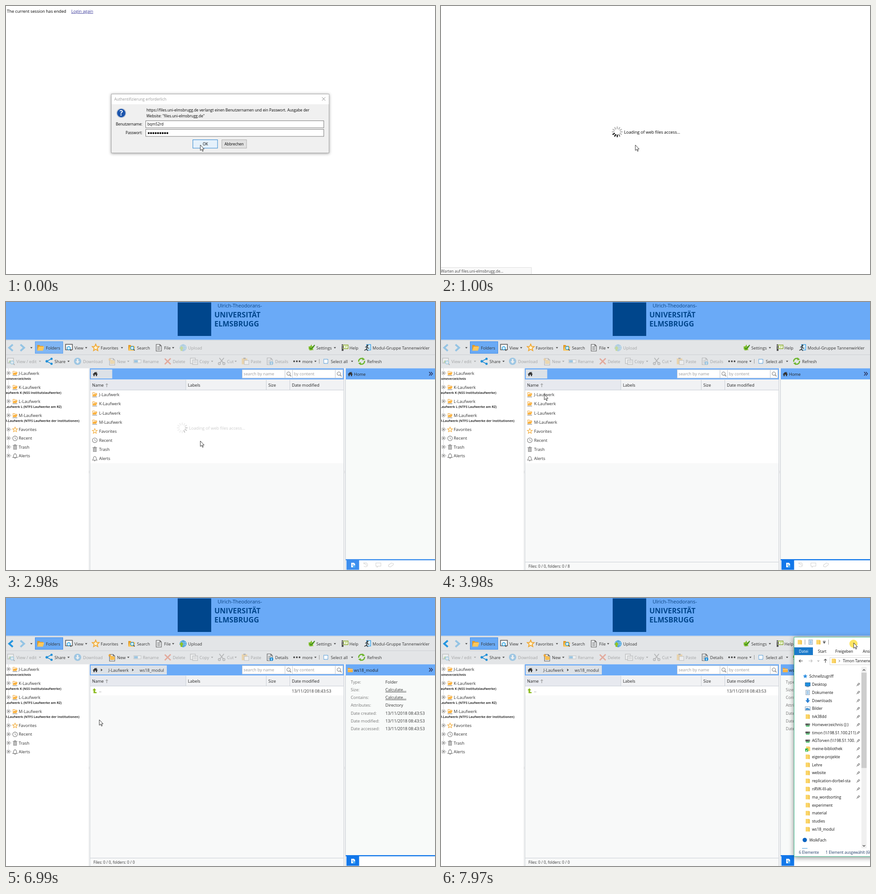
Write an HTML page that moves like this. It is 947x592 px and loops after 8 s.

```html
<!DOCTYPE html>
<html lang="en">
<head>
<meta charset="utf-8">
<title>Web files access</title>
<style>
html, body { margin: 0; width: 100%; height: 100%; overflow: hidden; background: #fff; }
svg { display: block; width: 100vw; height: 100vh; font-family: "Open Sans", "Noto Sans", sans-serif; }
text { white-space: pre; }
</style>
</head>
<body>
<svg id="stage" viewBox="0 0 947 592"></svg>
<script>
const stage = document.getElementById('stage');
const LOOP = 8000;
const STARTS = [0, 1000, 1980, 2980, 3980, 4990, 6010, 6990, 7970];
const BLUE = '#6aaaf7', BAR = '#e3e5e7', INK = '#333';
const HOST = 'files.uni-elmsbrugg.de', COURSE = 'ws18_modul';

const text = (x, y, s, size = 9.2, fill = INK, more = '') =>
  `<text x="${x}" y="${y}" font-size="${size}" fill="${fill}" ${more}>${s}</text>`;
const rect = (x, y, w, h, fill, more = '') =>
  `<rect x="${x}" y="${y}" width="${w}" height="${h}" fill="${fill}" ${more}/>`;
const path = (d, fill, more = '') => `<path d="${d}" fill="${fill}" ${more}/>`;
const line = (d, color, w = 1, more = '') => path(d, 'none', `stroke="${color}" stroke-width="${w}" ${more}`);
const circle = (x, y, r, fill, more = '') => `<circle cx="${x}" cy="${y}" r="${r}" fill="${fill}" ${more}/>`;
const at = (x, y, s, more = '', scale = 1) =>
  `<g transform="translate(${x} ${y}) scale(${scale})" ${more}>${s}</g>`;
const edge = (c, w = 1) => `stroke="${c}" stroke-width="${w}"`;
const tri = (x, y) => path(`M${x - 2.5} ${y - 1.3}h5l-2.5 3z`, '#444');
const triRight = (x, y) => path(`M${x - 1.5} ${y - 3}v6l3.5-3z`, '#444');

const starPath = r => 'M' + Array.from({ length: 10 }, (_, i) => {
  const a = i * Math.PI / 5, k = i % 2 ? r * 0.45 : r;
  return `${(k * Math.sin(a)).toFixed(2)} ${(-k * Math.cos(a)).toFixed(2)}`;
}).join('L') + 'z';
const folder = path('M-5.5-4.5h4.5l1 1.5h5.5v1.2h-11z', '#f0a02c') + path('M-5.5-1.2h11v6.2h-11z', '#fdb541') + line('M-5.5-1.4h11', '#fff2d6', 0.8);
const lens = line('M2.2 2.2L5 5', '#444', 1.8) + circle(-0.5, -0.5, 3.6, '#d9f0fb', edge('#1f9bdc', 1.5));
const sheet = line('M-5.5-7.5h8l3.5 3.5v11.5h-11.5zM2.5-7.5v3.5h3.5M-3-2h6M-3 1h6M-3 4h6', '#666', 1.2);
const openFolder = path('M-7-6h5l1.5 2h6.5v10h-13z', '#e09a28') + path('M-4-2.5h12.5l-3 9h-12.5z', '#fdc75c');

const ICONS = {
  folder,
  openFolder,
  drive: line('M-4.5 3v-7.5h3.5l1 1.5h4v2', '#f3b04a', 1.2) + path('M-2.5-1.5h8l-2.6 5h-8z', '#fbb03b') + line('M-5.5 5h10.5', '#888', 1.2),
  star: path(starPath(5.8), '#fffbe8', edge('#f2a93b', 1.1)),
  bigStar: path(starPath(8), '#fff3d0', edge('#f0a52d', 1.8)),
  clock: circle(0, 0, 5.2, '#fff', edge('#777', 1.1)) + line('M0-3v3.3l2.4 1.3', '#777'),
  trash: path('M-4-3h8v8.5h-8z', '#a2a2a2') + line('M-5-4h10M-2-5.2h4', '#888', 1.2) + line('M-1.8-1.5v5.5M0-1.5v5.5M1.8-1.5v5.5', '#eee', 0.7),
  bell: path('M-4.8 3.5C-2.5 1.5-4-4.5 0-4.8C4-4.5 2.5 1.5 4.8 3.5z', '#fff', edge('#777', 1.1)) + circle(0, 5, 1.1, '#777'),
  home: path('M-5.5.5L0-4.8 5.5.5 4.5 1.4 4 1v3.8h-2.6v-3.2h-2.8v3.2h-2.6v-3.8l-.5.4z', '#333') + rect(2.2, -4.5, 1.4, 3, '#333'),
  search: line('M2 2L5 5.2', '#777', 1.4) + circle(-0.8, -0.8, 3.7, 'none', edge('#777', 1.1)),
  view: rect(-7.5, -7.5, 15, 12, '#fff', edge('#555', 1.6)) + at(0, 1.5, lens),
  find: openFolder + at(2, 1, lens),
  sheet,
  globe: circle(1, 0, 7.2, '#9bd2f2', edge('#2e9be6')) + line('M1-7v14M-6 0h14M-4.5-4h11M-4.5 4h11M1-7c-5 4-5 10 0 14M1-7c5 4 5 10 0 14', '#2e86c4', 0.8) + path('M-4.5 7v-5h-3l5-6 5 6h-3v5z', '#8fc31f'),
  settings: path(starPath(7.5), '#7dbd2c') + circle(-1, 1, 5, '#86c232') + line('M-3.5 0l3 3 8-9', '#3d8b1d', 2),
  help: rect(-3, -6, 10, 8, '#fff', edge('#88a82b', 1.5)) + line('M0-3.5h5M0-1h4', '#8fc31f', 1.2) + circle(-5.5, -6, 1.7, '#555') + line('M-6-3v10M-7-3l5 2M-4 2v5', '#555', 2),
  user: rect(-2, -7, 9, 12, '#d7eefb', edge('#2e9be6', 1.3)) + circle(0, -5, 1.9, '#444') + line('M-5-1l4-2 2 4 3 0M-1-2l-1 5 3 4M-2 3l-5 3', '#444', 1.6),
  edit: rect(-7.5, -7, 13, 11, '#fff', edge('#777', 1.3)) + path('M-6 3l4-6 4 6z', '#6bab4a') + at(3, 3, lens),
  share: line('M6-6L-5 0l11 6', '#1f8fd8', 1.6) + circle(5.5, -5.5, 2.5, '#1f8fd8') + circle(-5, 0, 2.8, '#1f8fd8') + circle(5.5, 5.5, 2.5, '#1f8fd8'),
  download: circle(0, 0, 8, '#2592dc') + path('M-1.8-5h3.6v5h3l-4.8 5-4.8-5h3z', '#fff'),
  add: at(1, 1, sheet) + path('M-3-3h5l1 1.5h4v7h-10z', '#fbbf4e') + path(starPath(4), '#f0a52d', 'transform="translate(-4 -4)"'),
  rename: rect(-8, -3.5, 16, 7, '#fff', edge('#888')) + rect(-7, -2.5, 8, 5, '#1f8fd8'),
  remove: line('M-6.5-6L6.5 6.5M6.5-6.5L-6.5 6.5', '#e2461f', 3),
  copy: rect(-8, -7, 11, 12, '#fff', edge('#777', 1.3)) + rect(-3, -3, 11, 10, '#fff', edge('#777', 1.3)) + line('M-1 0h7M-1 3h7', '#777'),
  cut: line('M-5-7.5L4 4M5-7.5L-4 4', '#666', 2) + circle(-5, 5, 2.4, 'none', edge('#666', 1.6)) + circle(5, 5, 2.4, 'none', edge('#666', 1.6)),
  paste: rect(-7.5, -6.5, 12, 13, '#f5b547') + rect(-4, -8, 5, 3, '#666') + rect(-2, -2, 10, 9, '#fff', edge('#777')),
  details: sheet + circle(4, 4, 4, '#1f8fd8') + rect(3.3, 3, 1.4, 4, '#fff') + rect(3.3, 1.2, 1.4, 1.2, '#fff'),
  dots: [-6, 0, 6].map(x => circle(x, 0, 1.9, '#444')).join(''),
  select: rect(-4.5, -4.5, 9, 9, '#fff', edge('#1f7fd0', 1.4) + ' stroke-dasharray="1.6 1.4"'),
  refresh: line('M-6.3 1A6.3 6.3 0 0 1 3.5-5.2M6.3-1A6.3 6.3 0 0 1-3.5 5.2', '#6cb52d', 2.6) + path('M2-8.5l5.5 4.5-6 2z', '#6cb52d') + path('M-2 8.5l-5.5-4.5 6-2z', '#6cb52d'),
  up: path('M-5-1L-1-5.5 3-1H.7v4H4v2.5H-2.7V-1z', '#8aba1c'),
  yellow: path('M-4.5-5h7l2 1.5v8.5h-9z', '#fbd569') + path('M2.5-5l2 1.5v8.5h-2z', '#eebf45'),
  pin: line('M-3.5 3.5L-.8.8M-2-.8l2.8 2.8M-1-.8l2.5-2.4M.8 1l2.4-2.5M1-3.5l2.5 2.5', '#777', 1.1),
  desktop: rect(-5.5, -4, 11, 7.5, '#1d8fe0', edge('#245f92', 0.8)) + line('M-3 5h6', '#245f92'),
  doc: rect(-4, -5, 8, 10, '#fff', edge('#6c8aa8', 0.9)) + line('M-2.5-2.5h5M-2.5 0h5M-2.5 2.5h5', '#2b86cf', 1.1),
  down: path('M-2-5h4v4.5h3L0 5.5-5-.5h3z', '#2a80d2'),
  image: rect(-5.5, -4, 11, 8, '#fff', edge('#6c8aa8', 0.9)) + path('M-4.5 3v-3l3-1.5 6 2v2.5z', '#3d8fd0'),
  net: rect(-5, -2.5, 10, 4, '#555') + rect(-4, 2, 8, 2, '#22b24c') + rect(2, -1.2, 2, 1.2, '#7bea8c'),
  check: at(1, 0, path('M-4.5-5h7l2 1.5v8.5h-9z', '#fbd569')) + rect(-5.5, -0.5, 6.5, 6.5, '#1fae3a') + line('M-4.2 3l1.5 1.5 2.6-3', '#fff', 1.1),
  quick: path(starPath(5.2), '#2f8fe0'),
  dot: circle(0, 0, 4.8, '#0a64c2')
};
const icon = (name, x, y, opacity = 1, scale = 1) => at(x, y, ICONS[name], `opacity="${opacity}"`, scale);

function spinner(x, y, head, scale = 1) {
  const shades = ['#000', '#000', '#111', '#777'];
  let s = '';
  for (let i = 0; i < 12; i++) {
    const shade = shades[(head - i + 12) % 12] || '#b8b8b8';
    s += rect(-1.2, -12, 2.4, 6, shade, `rx="1" transform="rotate(${i * 30})"`);
  }
  return at(x, y, s, '', scale);
}
const loader = (head, opacity) =>
  `<g opacity="${opacity}">${spinner(389, 278, head)}${text(404, 282, 'Loading of web files access...', 9.3, '#000')}</g>`;

const cursor = (x, y) =>
  at(x, y, path('M0 0V12.2L2.8 9.6 4.8 14 6.6 13.2 4.7 9H8.4z', '#fff', edge('#000', 0.8)));

function login() {
  const size = 8.35;
  let s = text(2, 15, 'The current session has ended', 9.2, '#000')
    + text(144, 15, 'Login again', 9.1, '#3b3a9a', 'text-decoration="underline"')
    + rect(232.5, 194.5, 480.5, 130, '#f0f0f0', edge('#a9a9a9') + ' style="filter:drop-shadow(0 1px 3px #0006)"')
    + rect(233, 195, 479.5, 22, '#fff')
    + text(239, 208.5, 'Authentifizierung erforderlich', size, '#999')
    + line('M697.5 201.5l7.5 7.5M705 201.5l-7.5 7.5', '#888')
    + circle(254.5, 236.5, 10, '#1c55ad', edge('#c3cbd8', 1.6))
    + text(254.5, 242, '?', 15.5, '#fff', 'font-weight="bold" text-anchor="middle"')
    + text(310, 233, `https://${HOST} verlangt einen Benutzernamen und ein Passwort. Ausgabe der`, size, '#000')
    + text(310, 245.5, `Website: "${HOST}"`, size, '#000');
  ['Benutzername:', 'Passwort:'].forEach((label, i) => {
    s += text(301, 264 + 19 * i, label, 8.2, '#000', 'text-anchor="end"')
      + rect(308.5, 253.5 + 19 * i, 393, 15.5, '#fff', edge('#7a7a7a'));
  });
  s += text(312, 264, 'bqm52rd', size, '#000');
  for (let i = 0; i < 9; i++) s += circle(315 + i * 5.15, 280.8, 2.1, '#000');
  const mid = 'text-anchor="middle"';
  return s + rect(412.5, 295.5, 54.5, 18.5, '#e5f1fb', edge('#2b83cf'))
    + text(440, 308, 'OK', size, '#000', mid)
    + rect(476.5, 295.5, 54.5, 18.5, '#e1e1e1', edge('#adadad'))
    + text(503.5, 308, 'Abbrechen', size, '#000', mid);
}

const waiting = () => rect(-0.5, 577.5, 200, 16, '#f9f9f9', edge('#dedede'))
  + text(0, 589, `Warten auf ${HOST}...`, 8.3, '#444');

const header = () => rect(0, 0, 947, 83.5, BLUE) + rect(379, 1, 74, 74, '#00468c')
  + text(467, 12, 'Ulrich-Theodorans-', 11, '#0d4583')
  + text(460, 34, 'UNIVERSITÄT', 16, '#00468c', 'font-weight="bold"')
  + text(460, 54, 'ELMSBRUGG', 16, '#00468c', 'font-weight="bold"');

function pathBar(crumbs, title) {
  const ends = [234.5, 278, 355], starts = [226, 295];
  let s = rect(185, 146.5, 561, 24.5, BLUE) + rect(187, 149, ends[crumbs.length] - 187, 20, '#dce1e7') + icon('home', 197, 159);
  crumbs.forEach((c, i) => s += triRight(211 + 69 * i, 159) + text(starts[i], 162.5, c));
  [[521.5, 'search by name'], [632.5, 'by content']].forEach(([x, hint]) => {
    s += rect(x, 149.5, 94.5, 18.5, '#fff', edge('#c5cbd3')) + text(x + 3, 162, hint, 9.2, '#999')
      + rect(x + 94.5, 149.5, 16.5, 18.5, '#fff', edge('#c5cbd3')) + icon('search', x + 103, 159);
  });
  return s + rect(750, 146.5, 197, 24.5, BLUE)
    + icon(title === 'Home' ? 'home' : 'folder', 760, 159) + text(768, 162.5, title, 9.2, '#222')
    + line('M934 154.5l3.5 4-3.5 4M938 154.5l3.5 4-3.5 4', '#224', 1.3);
}

function emptyApp() {
  const nav = '#9a9fa5';
  return rect(0, 147, 182, 445, '#e4e4e4')
    + rect(54.5, 359.5, 67.5, 22.5, '#ededed', edge(BLUE, 3)) + rect(56.5, 361.5, 63.5, 18.5, 'none', edge('#fff', 0.8))
    + spinner(66, 371, 8, 0.45) + text(74, 374, 'Loading...', 8.8)
    + rect(186, 562.5, 559, 24, '#dde2e7') + line('M186 562.5h559', '#cdd3d9')
    + path('M200 572.5v6l-4-3zM220 572.5v6l-5-3zM314.5 572.5v6l5-3zM334.5 572.5v6l4-3z', nav)
    + line('M194 572.5v6M340.5 572.5v6', nav, 1.3)
    + line('M229.5 570v10M305.5 570v10M349.5 570v10', '#aaa')
    + text(234, 579, 'Page', 8.6) + rect(259.5, 566.5, 21, 17.5, '#e4e7ea', edge('#d2d7dc')) + text(262, 579, '0', 8.6, '#aaa')
    + text(286, 579, 'of 0', 8.6)
    + at(360, 575.5, line('M-3.5 0A3.5 3.5 0 0 1 3-2M3.5 0A3.5 3.5 0 0 1-3 2', '#555', 1.5) + path('M4.5-4.5v4h-4zM-4.5 4.5v-4h4z', '#555'))
    + text(741, 579, 'No data to display', 8.5, INK, 'text-anchor="end"');
}

// icon, icon x, label, label x, arrow x, first scene in which it is enabled
const ROW1 = [
  ['view', 139, 'View', 151, 177, 3], ['bigStar', 198, 'Favorites', 209, 256, 3], ['find', 277, 'Search', 289, 0, 3],
  ['sheet', 337, 'File', 349, 369, 3], ['globe', 390, 'Upload', 402, 0, 5], ['settings', 674, 'Settings', 685, 726, 3],
  ['help', 748, 'Help', 758, 0, 3], ['user', 798, 'Modul-Gruppe Tannenwirkler', 809, 0, 3]
];
const ROW2 = [
  ['edit', 11, 'View / edit', 23, 75, 9], ['share', 95, 'Share', 107, 138, 3], ['download', 158, 'Download', 170, 0, 9],
  ['add', 233, 'New', 245, 270, 5], ['rename', 290, 'Rename', 302, 0, 9], ['remove', 357, 'Delete', 368, 0, 9],
  ['copy', 415, 'Copy', 427, 455, 9], ['cut', 476, 'Cut', 488, 507, 9], ['paste', 528, 'Paste', 540, 0, 9],
  ['details', 582, 'Details', 594, 0, 5], ['dots', 642, 'more', 654, 683, 3], ['select', 706, 'Select all', 717, 764, 3],
  ['refresh', 785, 'Refresh', 797, 0, 3]
];

function toolbar(n) {
  const row = (items, y) => items.map(([name, ix, label, tx, ax, from]) =>
    `<g opacity="${n >= from ? 1 : 0.36}">${icon(name, ix, y)}${text(tx, y + 3.7, label)}${ax ? tri(ax, y) : ''}</g>`).join('');
  const chevron = (x, dir, on) => line(`M${x + 4 * dir} 94l${-8 * dir} 7 ${8 * dir} 7`, '#2596e0', 4, `opacity="${on ? 1 : 0.42}"`);
  return rect(0, 84, 947, 62.5, BAR) + line('M0 84.5h947M0 116.5h947', '#cdd0d3')
    + chevron(11, 1, n >= 5) + chevron(36, -1, false) + tri(56, 101)
    + rect(64.5, 87.5, 61, 26, n === 3 ? '#80b6f4' : '#6aaaf5', edge(n === 3 ? '#5a9fee' : '#3f8ae6'))
    + icon('openFolder', 76, 101) + text(88, 104.7, 'Folders')
    + row(ROW1, 101) + row(ROW2, 131) + line('M691.5 126v10', '#999');
}

function tree() {
  const drives = [
    ['J', 'Homeverzeichnis', 55], ['K', 'Laufwerk K (NSS Institutslaufwerke)', 122],
    ['L', 'Laufwerk L (NTFS Laufwerke am RZ)', 123], ['M', 'M-Laufwerk (NTFS Laufwerke der Institutionen)', 162]
  ];
  const plus = y => rect(2.5, y - 3, 6, 6, '#fff', edge('#999', 0.9)) + line(`M3.8 ${y}h3.4M5.5 ${y - 1.7}v3.4`, '#333', 0.9)
    + line(`M9 ${y}h4`, '#999', 1, 'stroke-dasharray="1 1"');
  let s = rect(0, 147, 182, 445, '#fff') + rect(182, 147, 3.5, 445, '#f0f1f2') + line('M5.5 147v189', '#bbb', 1, 'stroke-dasharray="1 1"');
  drives.forEach(([d, note, end], i) => {
    const y = 157 + 31.1 * i;
    s += plus(y) + icon('drive', 20, y + 0.5) + text(28, y + 3.6, d + '-Laufwerk', 9.3)
      + text(end, y + 14.6, note, 7, INK, 'font-weight="bold" text-anchor="end"');
  });
  ['star', 'clock', 'trash', 'bell'].forEach((name, i) => {
    const y = 281.5 + 19.3 * i;
    s += plus(y) + icon(name, 20, y + 0.5) + text(28, y + 3.6, EXTRAS[i], 9.3);
  });
  return s;
}
const EXTRAS = ['Favorites', 'Recent', 'Trash', 'Alerts'];
const ORANGE = '#e8901a';
const UP = ['up', '..', '13/11/2018 08:43:53'];
const LISTS = {
  home: [...[...'JKLM'].map(d => ['drive', d + '-Laufwerk']), ['star', EXTRAS[0]], ['clock', EXTRAS[1]], ['trash', EXTRAS[2]], ['bell', EXTRAS[3]]],
  drive: [UP, ['folder', 'PDFs', '12/11/2018 10:33:48', ORANGE, '#35a2e8'], ['folder', 'raw', '2/8/2018 15:13:34'],
    ['folder', COURSE, '13/11/2018 08:43:53', ORANGE]],
  course: [UP]
};

function grid(rows, status) {
  let s = rect(186, 171, 559, 421, '#f8f9f9') + rect(186, 171.5, 559, 23, '#f1f2f4') + rect(186, 171.5, 211, 23, '#e7e9ef')
    + line('M186 194.5h559M397 172v22M574.5 172v22M626.5 172v22', '#c9ced5')
    + rect(186, 195, 559, rows.length * 20.15, '#fff')
    + line('M185.5 171v421M745.5 171v421', '#d0d4d9')
    + line('M222.5 188v-7M219.8 183l2.7-2.8 2.7 2.8', '#888');
  [[190, 'Name'], [401.5, 'Labels'], [579, 'Size'], [631, 'Date modified']].forEach(([x, c]) => s += text(x, 187.3, c, 9.2, '#222'));
  rows.forEach(([name, label, date, ...marks], i) => {
    const y = 204.7 + 20.15 * i;
    s += icon(name, 196, y) + text(205.5, y + 3.5, label);
    if (date) s += text(631, y + 3.9, date, 9.15);
    marks.forEach((m, k) => s += circle(407.4 + 15 * k, y + 0.3, 4.9, m));
  });
  if (status) s += line('M186 574.5h559', '#c9ced5') + text(193, 587, status, 8.35);
  return s;
}

function sidePanel(n) {
  const strong = n === 3 ? '#3c8eee' : '#1277ea';
  let s = rect(746, 147, 4, 445, '#f0f1f2') + rect(750, 171, 197, 397, '#f8faf9') + line('M749.5 171v421', '#c9ced5')
    + rect(750, 568, 197, 2.5, strong) + rect(751.5, 570, 28, 21.5, strong)
    + at(766, 581, path('M-4-5h6l2.5 2.5v7.5h-8.5z', '#fff') + line('M-2-1h4M-2 1h3', strong, 0.9) + circle(2.5, 3, 2.6, '#4fb0f5'))
    + line('M183.5 373v6M747.5 373v6', '#c8c8c8', 1, 'stroke-dasharray="1 1"');
  if (n < 5) {
    s += `<g opacity=".5">${line('M790 578a4.5 4.5 0 1 1 0 5M790 575v3.5h3M794.5 578v3l2 1', '#aaa', 1.1)}`
      + line('M816.5 576.5h11v7h-6l-2.5 2.5v-2.5h-2.5z', '#aaa', 1.1) + line('M844.5 581l6-4.5 5 1.5-1 3-6 4.5-4-1.5z', '#aaa', 1.1) + '</g>';
    return s;
  }
  const modified = '13/11/2018 08:43:53', made = n < 7 ? '19/10/2017 09:44:24' : modified;
  [['Type:', 'Folder'], ['Size:', 'Calculate...'], ['Contains:', 'Calculate...'], ['Attributes:', 'Directory'], ['Date created:', made],
    ['Date modified:', modified], ['Date accessed:', n < 7 ? '13/11/2018 10:13:02' : modified]].forEach(([k, v], i) => {
    const y = 189.3 + 17.05 * i, link = v === 'Calculate...';
    s += text(761, y, k, 9.2, '#777') + text(837.5, y, v, 9.15, INK, link ? 'text-decoration="underline"' : '');
  });
  return s;
}

function explorer() {
  const size = 8.5, dark = '#111';
  const items = [
    ['desktop', 'Desktop'], ['doc', 'Dokumente'], ['down', 'Downloads'], ['image', 'Bilder'], ['yellow', 'tvk38dd'],
    ['net', 'Homeverzeichnis (J:)'], ['net', 'timon (\\\\198.51.100.211)'], ['net', 'AGTorven (\\\\198.51.100.'],
    ['check', 'meine-bibliothek'], ...['eigene-projekte', 'Lehre', 'website', 'replication-dorbel-sta', 'nRVK-III-ab',
      'ma_wordsorting', 'experiment', 'material', 'studies', COURSE].map(s => ['yellow', s])
  ];
  let s = rect(779.5, 86.5, 180, 484.5, '#fff', edge('#3fbf8f') + ' style="filter:drop-shadow(0 2px 6px #0007)"')
    + icon('yellow', 792, 97.5) + icon('doc', 816, 97.5) + icon('yellow', 833, 97.5)
    + line('M803.5 92v11M855.5 92v11', '#999') + path('M843 97.5h6l-3 3z', '#222') + line('M843 95.5h6', '#222')
    + rect(780, 109, 41, 17, '#1979ca') + text(790, 121, 'Datei', size, '#fff')
    + text(832, 121, 'Start', size, dark) + text(870.5, 121, 'Freigeben', size, dark) + text(931, 121, 'Ansicht', size, dark)
    + line('M780 126.5h167', '#e2e2e2')
    + line('M798.5 139h-8M793.5 136l-3 3 3 3', '#444', 1.1) + line('M811.5 139h8M816.5 136l3 3-3 3', '#bbb', 1.1)
    + line('M831 138l2 2 2-2', '#666') + line('M848.5 143v-8M845.5 138l3-3 3 3', '#444', 1.1)
    + rect(858.5, 131.5, 100, 16, '#fff', edge('#d5d5d5')) + icon('yellow', 867, 139) + line('M878 136.5l2.5 2.5-2.5 2.5', '#555')
    + text(887, 142.2, 'Timon Tannenwirkler', size, dark)
    + icon('quick', 804, 173) + text(813, 176.2, 'Schnellzugriff', size, dark);
  items.forEach(([name, label], i) => {
    const y = 191 + 17.76 * i;
    s += icon(name, 809.5, y) + text(819, y + 3.1, label, size, dark);
    if (i < 15) s += icon('pin', 921, y);
  });
  return s + icon('dot', 803, 534.5) + text(813, 537.6, 'WolkFach', size, dark) + rect(797, 552.5, 12, 1.2, '#5aa5dd')
    + rect(928, 152, 11.5, 401, '#f0f0f0') + rect(928, 165, 11.5, 210.5, '#cdcdcd')
    + line('M931 160.5l2.7-2.7 2.7 2.7M931 546l2.7 2.7 2.7-2.7', '#444', 1.3)
    + text(790, 565.3, '6 Elemente', size, '#1d3a66') + text(849, 565.3, '1 Element ausgewählt (60 KB)', size, '#1d3a66');
}

function scene(n) {
  if (n === 0) return login() + cursor(429, 307);
  if (n === 1) return loader(8, 1) + waiting() + cursor(429, 307);
  const crumbs = n < 5 ? [] : n < 7 ? ['J-Laufwerk'] : ['J-Laufwerk', COURSE];
  const title = crumbs[crumbs.length - 1] || 'Home';
  if (n === 2) return header() + emptyApp() + pathBar(crumbs, title) + loader(7, 1) + cursor(429, 307);
  const rows = n < 5 ? LISTS.home : n < 7 ? LISTS.drive : LISTS.course;
  const count = n < 5 ? 8 : n < 7 ? 3 : 0;
  const body = header() + toolbar(n) + tree() + grid(rows, n > 3 && `Files: 0 / 0, folders: 0 / ${count}`)
    + sidePanel(n) + pathBar(crumbs, title);
  if (n === 3) return body + loader(5, 0.2) + cursor(429, 307);
  if (n < 6) return body + cursor(228, 204);
  if (n < 8) return body + cursor(206, 269);
  return body + explorer() + circle(910.5, 101, 9, '#fbe04a', 'opacity=".85"') + cursor(911, 99);
}

let shown = -1;
function update(now) {
  const t = now % LOOP;
  const n = STARTS.filter(s => s <= t).length - 1;
  if (n !== shown) stage.innerHTML = scene(shown = n);
}

const begin = performance.now();
function tick() {
  update(performance.now() - begin);
  requestAnimationFrame(tick);
}
tick();
</script>
</body>
</html>
```
